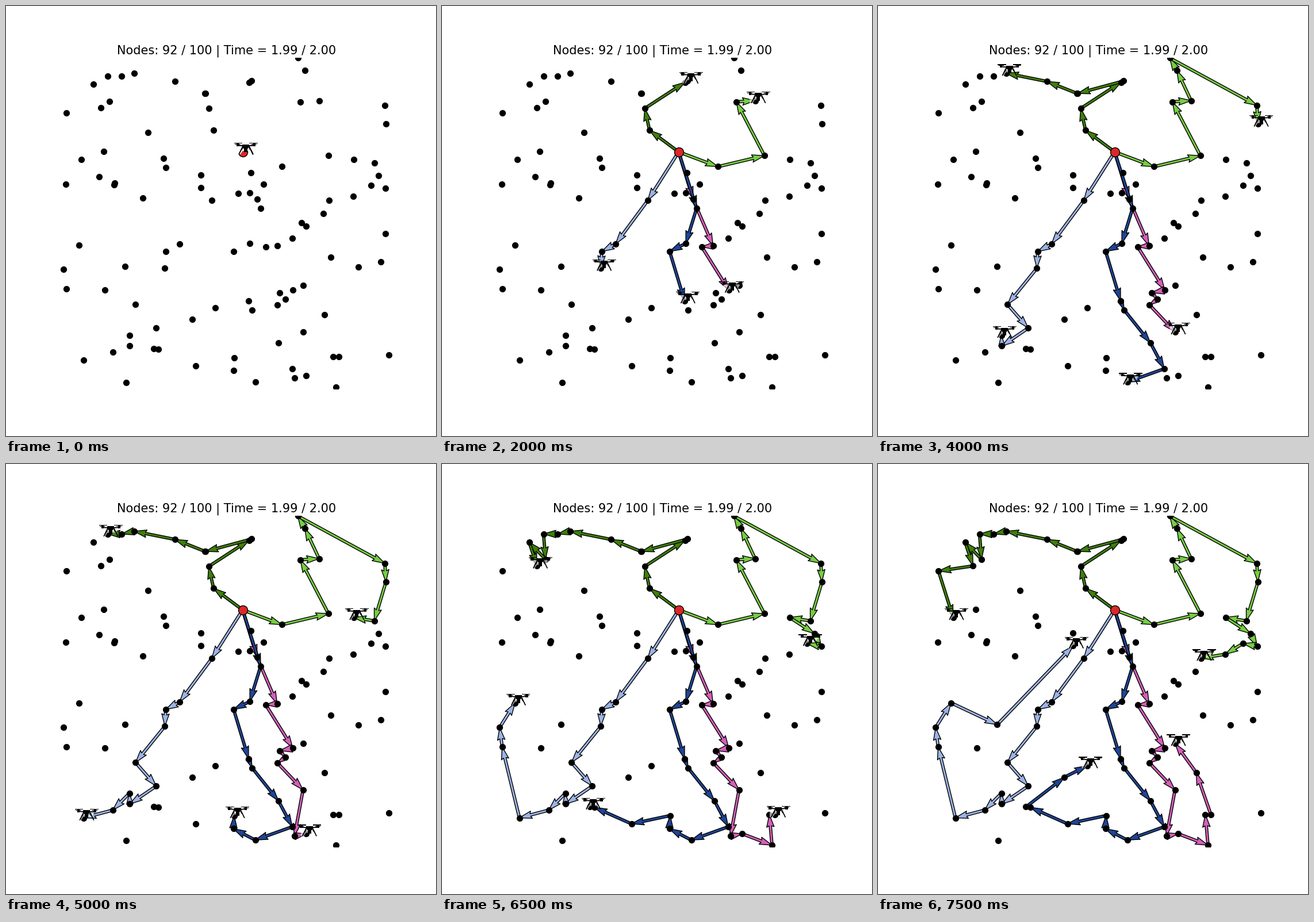
Animation, 748 px wide and 748 px high, one loop 8000 ms. Source, as a matplotlib script:

```python
import numpy as np
import matplotlib.pyplot as plt
from matplotlib.animation import ArtistAnimation
from matplotlib.collections import PolyCollection

SIZE, DPI = 748, 100
STEPS, STEP_MS = 16, 500

# Random nodes in the unit square; node 0 is the depot
np.random.seed(0)
NODES = np.random.rand(101, 2)

# Order in which each drone visits its nodes
ROUTES = {
    "#d65fbc": [53, 69, 65, 56, 64, 50, 28, 84, 89, 37, 49, 33, 34, 87, 94],
    "#1f4596": [1, 25, 14, 42, 91, 31, 21, 48, 85, 43, 79, 39, 38, 95, 29],
    "#9cb4e6": [16, 20, 40, 24, 98, 47, 23, 27, 30, 7, 63, 83, 99, 32, 62],
    "#3e7f0c": [11, 55, 6, 44, 3, 71, 88, 54, 96, 13, 75, 73, 77, 8, 41],
    "#76cd42": [22, 72, 81, 9, 51, 74, 82, 10, 19, 59, 61, 36, 92, 58, 78],
}
HOVER = 0.01  # drones float up and right of their node
INK, PALE = (0, 0, 0, 1), (1, 1, 1, 0.6)


def bar(x0, y0, x1, y1, width):
    p, q = np.array([x0, y0]), np.array([x1, y1])
    d = (q - p) / np.hypot(*(q - p)) * width / 2
    n = np.array([-d[1], d[0]])
    return np.array([p + n, q + n, q - n, p - n])


def drone_parts():
    """Polygons in pixels around the drone's centre, y up, with colours."""
    halo = np.array([(-15, 6), (15, 6), (9, -4), (-6, -4), (-10, -10), (-15, -10)])
    body = [bar(-6, 5, 6, 5, 5), bar(-4, 2, 4, 2, 3), bar(0, 1, 0, -6, 6)]
    half = [
        bar(6, 9.3, 20.5, 9.3, 1.3),      # blade
        bar(10, 7.3, 19, 7.3, 0.9),       # second blade
        bar(14.5, 9, 14.5, 4, 4.5),       # motor
        bar(4, 5, 14.5, 5.5, 1.8),        # arm
        bar(5.5, 4, 12.3, -10, 1.7),      # leg
        bar(4, 3, 8, -3, 0.9),            # strut
    ]
    black = body + [p * (side, 1) for side in (-1, 1) for p in half]
    return [(halo, PALE)] + [(p, INK) for p in black]


PARTS = drone_parts()

fig, ax = plt.subplots(figsize=(SIZE / DPI, SIZE / DPI), dpi=DPI)
ax.set_autoscale_on(False)
ax.set(xlim=(0, 1), ylim=(0, 1))
ax.axis("off")
ax.set_title("Nodes: 92 / 100 | Time = 1.99 / 2.00", fontsize=15, pad=4.7,
             fontfamily="DejaVu Sans")
AXES_PX = np.array(ax.get_position().size) * SIZE

ax.scatter(*NODES[1:].T, s=50, c="black", zorder=3)
ax.scatter(*NODES[0], s=132, c="#dc2727", edgecolors="black", linewidths=1, zorder=4)


def draw_arrows(path, color):
    p = NODES[path]
    return ax.quiver(*p[:-1].T, *np.diff(p, axis=0).T, angles="xy",
                     scale_units="xy", scale=1, width=0.0075, facecolor=color,
                     edgecolor="black", linewidth=1, zorder=2)


def draw_drones(stops):
    # A drone whose anchor leaves the axes is hidden
    anchors = [a for a in NODES[stops] + HOVER if a.max() <= 1]
    polys = [a + p / AXES_PX for a in anchors for p, _ in PARTS]
    colors = [c for _ in anchors for _, c in PARTS]
    drones = PolyCollection(polys, facecolors=colors, edgecolors="none",
                            zorder=5, clip_on=False)
    return ax.add_collection(drones, autolim=False)


frames = []
for step in range(STEPS):
    paths = {color: [0] + route[:step] for color, route in ROUTES.items()}
    arrows = [draw_arrows(path, color) for color, path in paths.items() if step]
    frames.append(arrows + [draw_drones([path[-1] for path in paths.values()])])

anim = ArtistAnimation(fig, frames, interval=STEP_MS, repeat=True, repeat_delay=0)
plt.show()
```
